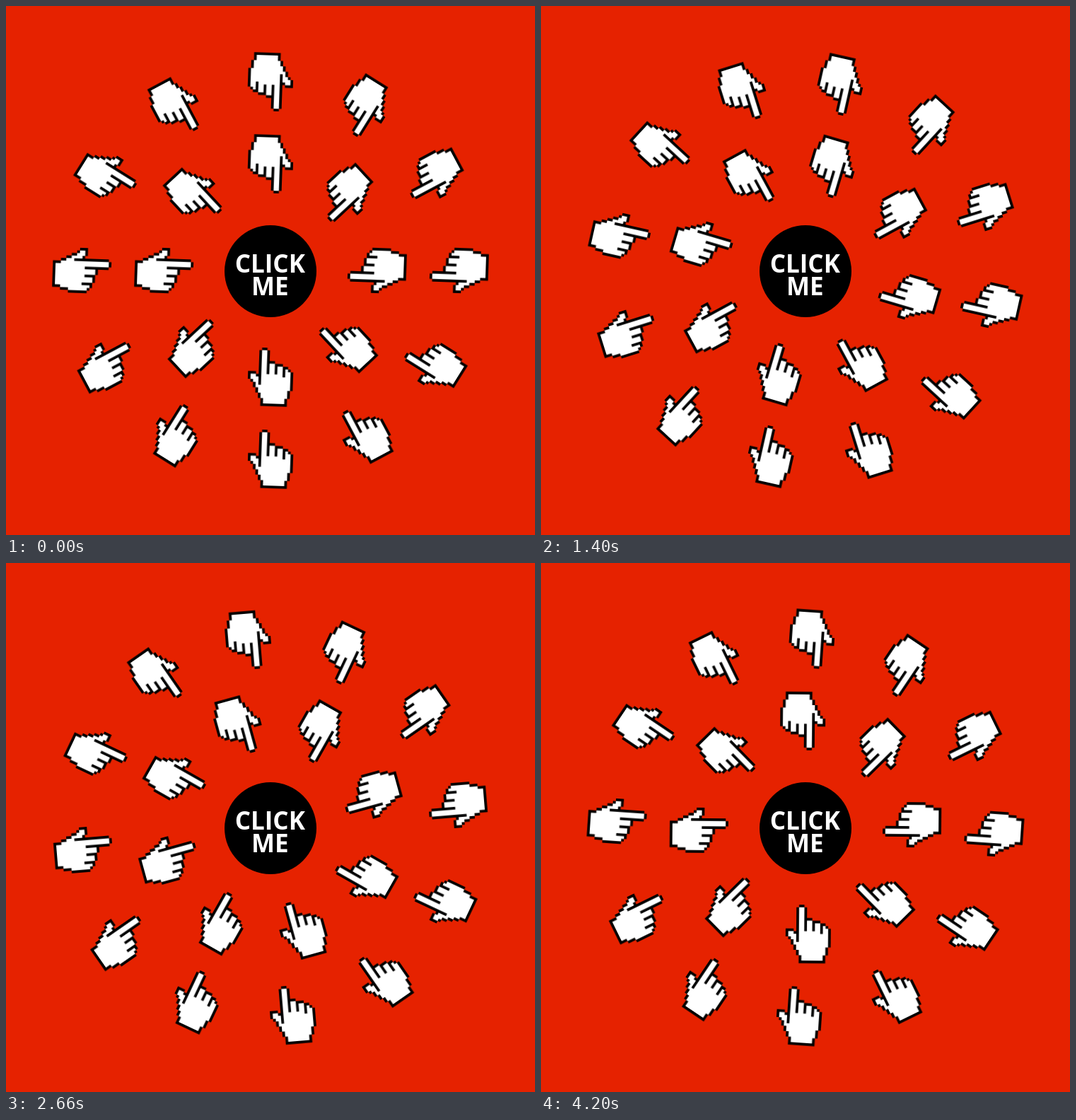
An HTML page that plays this animation: 748x748 px, repeating every 4.34 s.

```html
<!DOCTYPE html>
<html lang="en">
<head>
<meta charset="utf-8">
<title>Click me</title>
<style>
  html, body { margin: 0; width: 100%; height: 100%; overflow: hidden; background: #e62200; }
  svg { display: block; width: 100vw; height: 100vh; }
  .ring { animation: turn 4340ms steps(31) infinite; }
  .outer { --turn: -60deg; }
  .inner { --turn: 45deg; }
  @keyframes turn { to { transform: rotate(var(--turn)); } }
  text { font: 700 35px "Open Sans", "Noto Sans", sans-serif; fill: #fff; text-anchor: middle; }
</style>
</head>
<body>
<svg viewBox="0 0 748 748">
  <defs>
    <!-- pixel cursor on a 17 x 22 grid, centred on its own origin -->
    <g id="hand" transform="rotate(2) scale(3.76) translate(-8.5 -11)">
      <path d="M5 0h2v1h1v4h2v1h3v1h2v1h1v1h1v7h-1v3h-1v3h-10v-3h-1v-2h-1v-2h-1v-2h-1v-1h-1v-3h3v1h1v-9h1z"/>
      <path fill="#fff" d="M5 1h2v9h1v-4h2v4h1v-3h2v4h1v-3h1v1h1v7h-1v3h-1v2h-8v-2h-1v-2h-1v-2h-1v-2h-1v-1h-1v-2h2v1h1v3h1z"/>
    </g>
  </defs>
  <g transform="translate(374 374)">
    <g class="ring outer" data-count="12" data-radius="266.6"></g>
    <g class="ring inner" data-count="8" data-radius="150.6"></g>
  </g>
  <circle cx="374" cy="375" r="65"/>
  <text x="373.3" y="377">CLICK</text>
  <text x="373.3" y="408.5">ME</text>
</svg>
<script>
  for (const ring of document.querySelectorAll('.ring')) {
    const { count, radius } = ring.dataset;
    for (let i = 0; i < count; i++) {
      const hand = document.createElementNS('http://www.w3.org/2000/svg', 'use');
      hand.setAttribute('href', '#hand');
      hand.setAttribute('transform', `rotate(${360 / count * i}) translate(0 ${radius})`);
      ring.append(hand);
    }
  }
</script>
</body>
</html>
```
